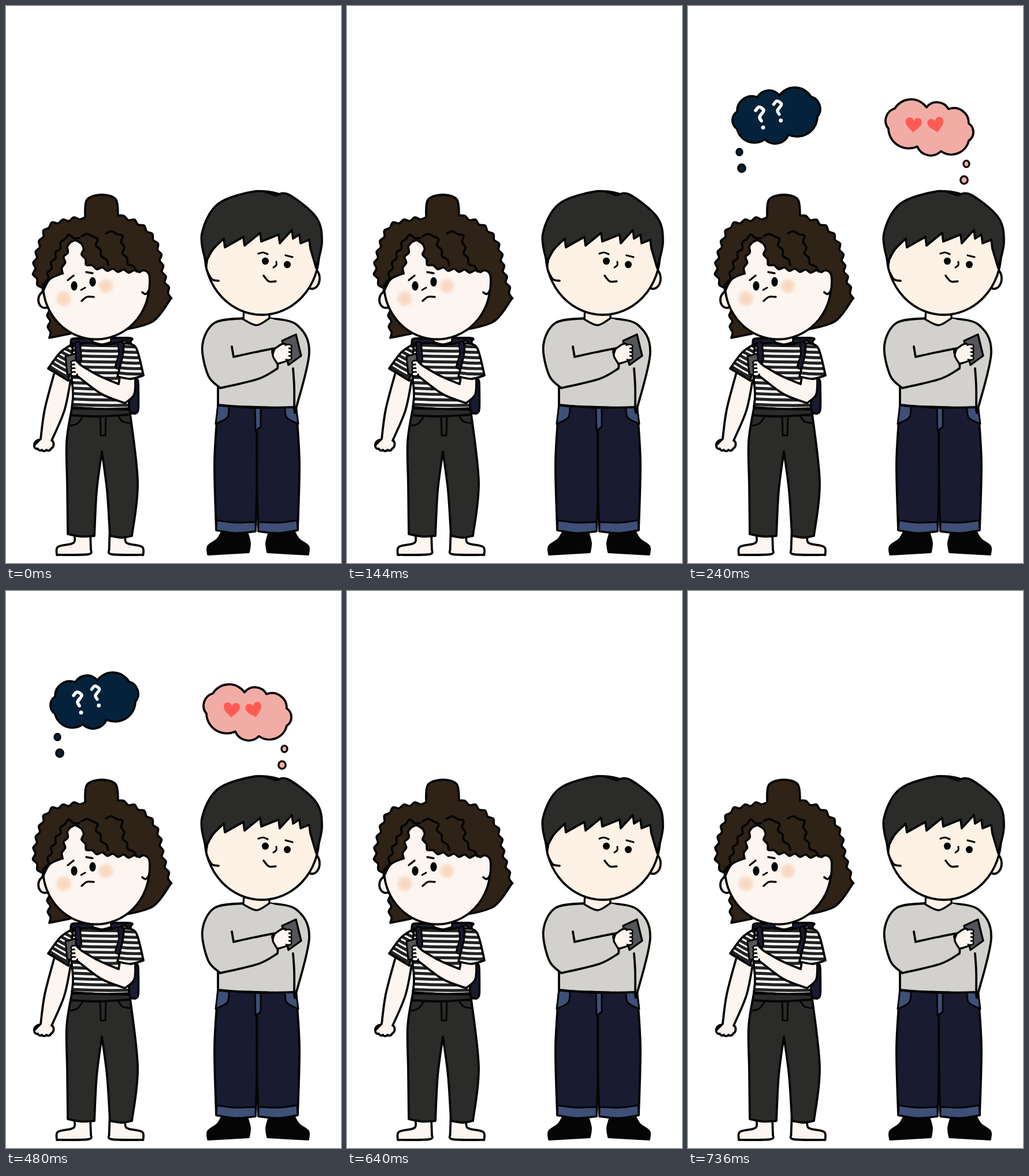
Animation, 580 px wide and 965 px high, one loop 0.8 s. Source, as an HTML page:

```html
<!DOCTYPE html>
<html lang="en">
<head>
<meta charset="utf-8">
<title>Two thoughts</title>
<style>
  html, body { margin: 0; width: 100%; height: 100%; overflow: hidden; background: #fff; }
  svg { display: block; width: 580px; height: 965px; }
  svg * { stroke-linecap: round; stroke-linejoin: round; }
</style>
</head>
<body>
<svg id="stage" viewBox="0 0 580 965" xmlns="http://www.w3.org/2000/svg">
  <defs>
    <radialGradient id="blush">
      <stop offset="0" stop-color="#f8d3ba"/>
      <stop offset=".6" stop-color="#f9dcc8" stop-opacity=".85"/>
      <stop offset="1" stop-color="#fdf5ef" stop-opacity="0"/>
    </radialGradient>
  </defs>
</svg>
<script>
const NS = 'http://www.w3.org/2000/svg';
const INK = '#050505', SKIN = '#fdf5ef', TAN = '#fef1e6', BROWN = '#2f2217', COAL = '#2b2b29';
const NAVY = '#191b31', DENIM = '#3e5078', GREY = '#d2d1cd', PHONE = '#55565a';
const NIGHT = '#04223c', PINK = '#f2aca6', RED = '#ff5b54';
const PEN = 3.8;
let layer = document.getElementById('stage');

function add(tag, attrs) {
  const el = document.createElementNS(NS, tag);
  for (const key in attrs) el.setAttribute(key, attrs[key]);
  return layer.appendChild(el);
}

function inside(tag, attrs, draw) {
  const outer = layer;
  const group = layer = add(tag, attrs);
  draw();
  layer = outer;
  return group;
}

// Draws a part and its reflection, where x becomes sum - x.
function mirrored(sum, draw) {
  draw();
  inside('g', { transform: `translate(${sum}) scale(-1 1)` }, draw);
}

const points = text => text.trim().split(/\s+/).map(p => p.split(',').map(Number));

// Smooth curve through points; "/" marks a corner.
function curve(text) {
  let d = '', last = null;
  for (const run of text.split('/')) {
    const pts = points(run);
    if (last) pts.unshift(last);
    else d = 'M' + pts[0];
    for (let i = 0; i < pts.length - 1; i++) {
      const a = pts[i - 1] || pts[i], b = pts[i], c = pts[i + 1], e = pts[i + 2] || c;
      const h1 = b.map((v, k) => v + (c[k] - a[k]) / 6);
      const h2 = c.map((v, k) => v - (e[k] - b[k]) / 6);
      d += `C${h1} ${h2} ${c}`;
    }
    last = pts.at(-1);
  }
  return d;
}

// Points of a curve pushed to either side in turn, which makes it curly.
function wavy(text, amp = 2.4, step = 9.5) {
  const path = document.createElementNS(NS, 'path');
  path.setAttribute('d', curve(text));
  const length = path.getTotalLength(), n = Math.round(length / step);
  return Array.from({ length: n + 1 }, (_, i) => {
    const s = i * length / n, p = path.getPointAtLength(s);
    const a = path.getPointAtLength(s - 1), b = path.getPointAtLength(s + 1);
    const push = i % n ? (i % 2 ? amp : -amp) : 0;
    const size = Math.hypot(b.x - a.x, b.y - a.y);
    return `${p.x + push * (b.y - a.y) / size},${p.y - push * (b.x - a.x) / size}`;
  }).join(' ');
}

// Round lobes from point to point, bulging outwards.
function lobes(text, fill, round = 0.6) {
  const pts = points(text);
  const arcs = pts.slice(1).map((p, i) => {
    const r = round * Math.hypot(p[0] - pts[i][0], p[1] - pts[i][1]);
    return `A${r} ${r} 0 0 0 ${p}`;
  });
  add('path', { d: `M${pts[0]}${arcs.join('')}`, fill, stroke: INK, 'stroke-width': PEN });
}

const line = (text, width = PEN, stroke = INK) =>
  add('path', { d: curve(text), fill: 'none', stroke, 'stroke-width': width });
const patch = (text, fill) => add('path', { d: curve(text) + 'Z', fill });
const shape = (text, fill, width = PEN) =>
  add('path', { d: curve(text) + 'Z', fill, stroke: INK, 'stroke-width': width });
const oval = (cx, cy, rx, ry, fill, width = 0) =>
  add('ellipse', { cx, cy, rx, ry, fill, stroke: INK, 'stroke-width': width });

function strap(text) {
  line(text, 12);
  line(text, 6, NAVY);
}

function fingers(x, y) {
  for (let i = 0; i < 4; i++) oval(x, y + 6.5 * i, 5.5, 3.6, SKIN, 2.6);
}

function striped(id, text, x, y, w, slope) {
  inside('clipPath', { id }, () => patch(text));
  patch(text, '#fff');
  inside('g', { 'clip-path': `url(#${id})` }, () => {
    for (let i = 0; i < 13; i++)
      add('path', {
        d: `M${x} ${y + 9.4 * i}q${w / 2} ${slope / 2 + 3} ${w} ${slope}`,
        fill: 'none', stroke: '#232323', 'stroke-width': 5.2
      });
  });
  shape(text, 'none');
}

function woman() {
  const left = wavy('137,366 105,371 72,383 54,425 49,465 64,496 73,530 75,575');
  const right = wavy('286,506 279,485 271,455 264,420 249,393 225,374 194,363');
  shape(`${left} / 110,568 / 160,540 / 205,561 / 255,546 286,506 / ${right} /
    190,335 165,327 140,336 137,366`, BROWN);

  // backpack
  shape('112,592 / 113,578 119,576 / 210,575 216,580 / 215,592', NAVY);
  shape('208,648 / 226,646 229,655 / 229,698 224,706 / 210,705', NAVY);

  // feet and trousers
  mirrored(325.5, () =>
    shape('118,914 / 117,930 90,937 88,951 / 142,950 147,942 / 146,914', SKIN));
  shape(`114,697 / 105,755 106,830 107,915 / 130,919 153,918 / 157,840 166,772 / 175,840 180,918 /
    200,921 218,918 / 228,825 214,699`, COAL);
  line('113,709 160,711 214,708');
  line('112,727 124,723 133,711', 3);
  line('194,710 202,720 217,723', 3);
  line('163,711 / 164,744 / 172,744 / 173,711', 3);

  // hanging arm
  lobes('60,752 49,762 55,767 62,769 70,769 78,767 79,752', SKIN);
  patch('60,749 / 52,758 / 78,762 / 80,749', SKIN);
  line('60,750 49,761');
  patch('83,638 67,699 60,752 / 79,754 / 101,701 112,648', SKIN);
  line('83,638 67,699 60,750');
  line('79,753 101,701 112,648');

  striped('torso', `118,585 150,584 166,588 195,583 / 212,590 213,697 / 165,698 114,695 /
    116,670 111,610 118,585`, 100, 586, 125, 2);
  striped('cuffL', '116,585 94,600 73,628 / 108,649 / 113,615 116,585', 66, 562, 56, 32);
  strap('124,586 126,612');
  strap('198,586 200,602 194,624');

  // phone and bent arm
  shape('103,607 / 121,602 / 121,640 / 106,638 / 103,607', PHONE, 3.2);
  shape('127,617 129,622 / 160,640 195,655 / 197,643 / 224,643 / 222,673 206,688 / 165,672 121,639', SKIN);
  fingers(118, 618);
  patch('119,615 / 129,624 / 131,636 / 121,637', SKIN);
  striped('cuffR', '204,584 225,592 238,640 / 216,646 193,642 / 202,605 204,584', 190, 588, 52, 2);

  // head
  shape('150,570 / 150,582 / 166,586 182,582 / 181,570', SKIN, 3);
  oval(67, 509, 11, 14, SKIN, PEN);
  oval(156, 482, 92, 95.5, SKIN, PEN);
  const hairline = `65,492 76,473 98,463 / ${wavy('98,463 102,435 112,409')} / 121,406 131,412 /
    ${wavy('131,412 138,444 165,455 231,461')}`;
  patch(`${hairline} / 251,472 / 245,400 200,378 120,378 72,415 61,470 / 65,492`, BROWN);
  line(hairline);
  oval(239, 479, 10.5, 20, SKIN);
  line('231,461 239,458 248,466 248,490 242,499 236,496');
  line(wavy('127,402 104,399 93,418 80,445 66,490'));
  line(wavy('131,399 153,398 160,420 177,449'));
  line(wavy('173,394 198,396 206,435 226,460'));

  // features
  oval(100, 507, 18, 18, 'url(#blush)');
  oval(173, 485, 17, 17, 'url(#blush)');
  oval(118, 485, 5.6, 8.2, INK);
  oval(150, 478, 5.6, 8.2, INK);
  line('107,475 117,467', 3.4);
  line('139,461 150,463', 3.4);
  line('130,492 137,488', 3);
  line('131,511 140,504 152,504', 3.4);
}

function man() {
  mirrored(873, () => shape('374,911 366,924 350,936 350,950 / 420,946 / 422,930 417,911', INK));
  mirrored(869, () => {
    shape('367,692 / 361,790 364,908 / 398,913 432,910 / 434.5,830 434.5,692', NAVY);
    shape('365,891 / 398,895 432,894 / 432,910 / 398,913 364,908', DENIM, 3);
    shape('367,692 / 386,694 / 383,713 363,724', DENIM, 3);
  });
  shape('431,695 / 432,736 / 441,729 / 441,695', DENIM, 3);

  // sweater
  shape('456,541 503,552 525,600 500,705 / 490,640', GREY);
  patch('411,541 / 434,553 456,541 / 490,550 / 506,590 / 499,695 / 367,691 / 366,640', GREY);
  line('497,628 499,660 499,700');
  line('367,658 / 367,691 / 430,696 498,695');
  const sleeve = `411,541 361,549 340,588 350,640 371,662 / 437,646 470,628 /
    470,620 461,600 465,593`;
  patch(sleeve, GREY);
  line(`${sleeve} / 430,600 394,608 / 391,590`);

  // phone and hand
  shape('478,580 / 502,569 / 511,606 / 489,622', PHONE, 3.4);
  shape('465,594 480,585 493,592 / 490,612 470,620 / 462,606 465,594', SKIN, 3.4);
  fingers(489, 590);
  patch('478,590 / 489,588 / 489,611 / 479,612', SKIN);

  // head
  shape('412,525 / 411,543 / 434,553 456,541 / 456,525', TAN, 3.4);
  oval(530, 472, 13, 18, TAN, PEN);
  oval(443, 428, 99, 107, TAN, PEN);
  oval(357, 457, 9, 16, TAN);
  line('348,442 347,455 356,473 368,476');

  // each tooth of the fringe rises slowly, then drops to its tip
  const teeth = points('379,418 413,415 442,408 474,411 497,403 510,411 527,420')
    .map(([x, y]) => `${x - 2},${y - 15} / ${x},${y}`).join(' / ');
  shape(`346,444 339,395 367,343 432,321 467,328 / 490,327 537,366 547,408 537,454 /
    ${teeth.split(' / ').reverse().join(' / ')} / 377,403 / 358,422 346,444`, '#2b2b2a');

  // features
  oval(449, 442, 6, 6.2, INK);
  oval(487, 448, 6, 6.2, INK);
  line('437,429 445,427 453,430', 3.2);
  line('484,432 496,435', 3.2);
  line('468,443 468,449 463,453', 3);
  line('446,467 455,477 467,477', 3.4);
}

function cloud(fill) {
  lobes('85,183 85,213 133,231 174,223 224,192 213,157 158,155 120,158 85,183', fill);
  oval(89, 253, 5, 5.6, fill, 3.4);
  oval(93, 281, 6.2, 6.6, fill, 3.4);
}

function question(x, y, size) {
  inside('g', { transform: `translate(${x} ${y}) scale(${size})` }, () => {
    line('-7,-7 -1,-13 7,-7 0,4 3,11', 5.6, '#fff');
    oval(6, 22.5, 3.5, 3.5, '#fff');
  });
}

function heart(x, turn) {
  add('path', {
    d: 'M0 13C-6 7-14 2-14-5C-14-14-3-15 0-7C3-15 14-14 14-5C14 2 6 7 0 13Z',
    fill: RED, transform: `translate(${x} 206) rotate(${turn})`
  });
}

woman();
man();
const thoughts = inside('g', { opacity: 0 }, () => {
  cloud(NIGHT);
  question(124, 188, 1);
  question(155, 177, 0.95);
  inside('g', { transform: 'translate(571 20.5) scale(-1 1)' }, () => cloud(PINK));
  heart(390.5, 4);
  heart(429.5, -14);
});

const steps = [[0, 0], [240, 1], [640, 0], [800, 0]];
thoughts.animate(
  steps.map(([ms, opacity]) => ({ offset: ms / 800, opacity, easing: 'step-end' })),
  { duration: 800, iterations: Infinity }
);
</script>
</body>
</html>
```
